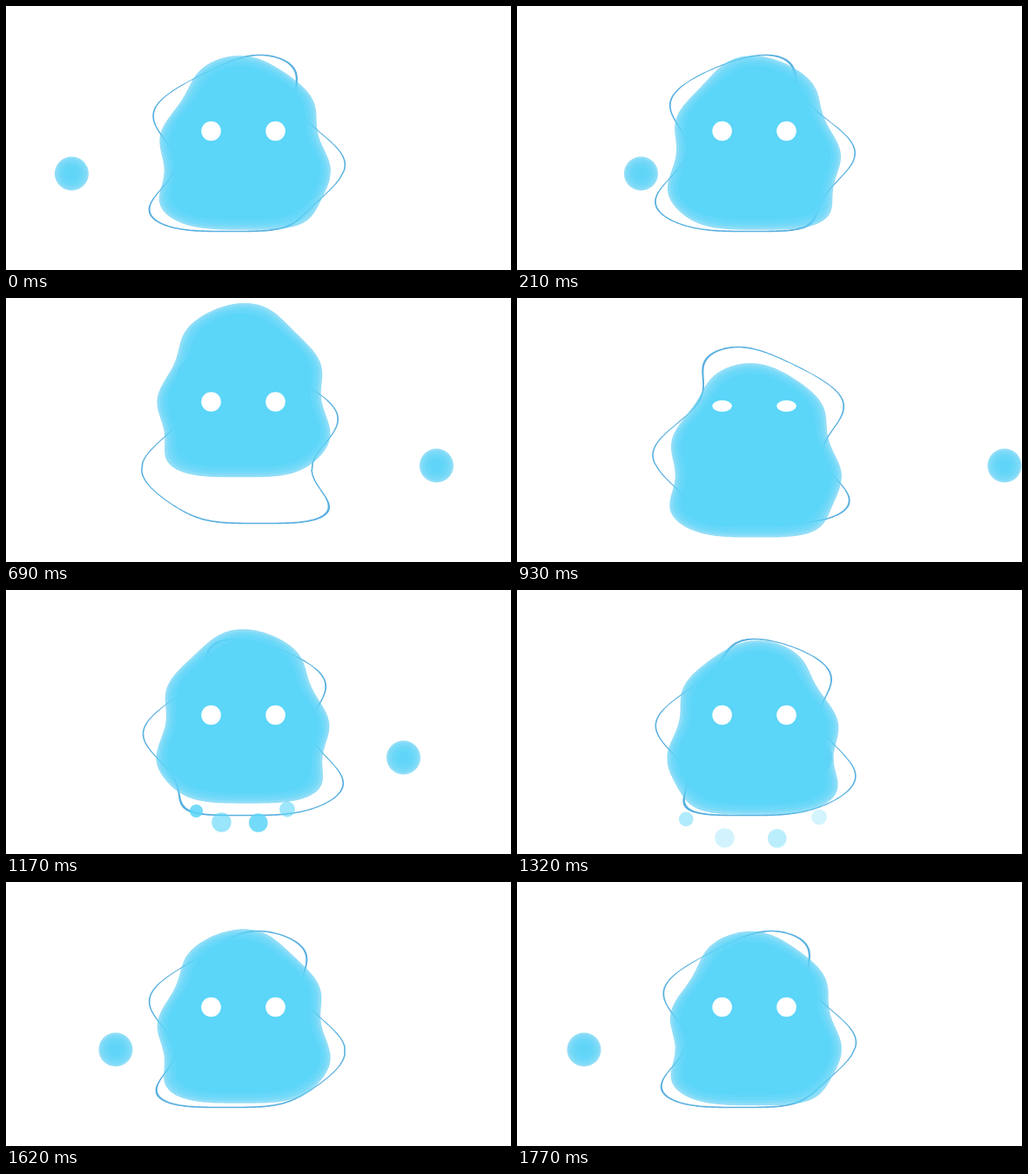
Recreate the animation shown at these times as an HTML page with a canvas. Size 580 by 304 pixels, loop 1800 ms.

```html
<!DOCTYPE html>
<html lang="en">
<head>
<meta charset="utf-8">
<title>Jumping blob</title>
<style>
  html, body { margin: 0; width: 100%; height: 100%; overflow: hidden; background: #fff; }
  canvas { display: block; }
</style>
</head>
<body>
<canvas id="stage" width="580" height="304"></canvas>
<script>
const ctx = document.getElementById('stage').getContext('2d');
const LOOP = 1800, STEP = 30, TAU = Math.PI * 2;
const CORE = '#5bd5f8', EDGE = '#5acdf3', LINE = '#58b0e0';
const CX = 272.6, MID = 190;

// Time and value pairs, eased between neighbours.
const bodyKeys = [[0, 0], [480, 0], [715, -53], [880, 21.5], [1130, -13], [1440, 8], [1660, -4], [1800, 0]];
const eyeKeys = [[0, 0], [500, 0], [680, -24.5], [870, -24.5], [1080, 0], [1800, 0]];
const blinkKeys = [[0, 1], [750, 1], [870, 0.12], [985, 1], [1800, 1]];
const ballKeys = [[0, 75.4], [900, 561.5], [1800, 75.4]];

// Position at 1170 ms, speed per ms, radius, opacity and end of fade.
const drops = [
  { x: 218.5, y: 254.5, vx: -0.162, vy: 0.062, r: 7.6, grow: 0.005, a: 0.85, end: 1520 },
  { x: 247.5, y: 267.5, vx: -0.06, vy: 0.12, r: 11.2, grow: 0, a: 0.62, end: 1440 },
  { x: 289.8, y: 268, vx: 0.06, vy: 0.12, r: 10.8, grow: 0, a: 0.85, end: 1460 },
  { x: 323, y: 252.5, vx: 0.16, vy: 0.06, r: 9, grow: 0, a: 0.6, end: 1440 }
];

const smooth = p => p * p * (3 - 2 * p);

function tween(keys, t) {
  const i = Math.max(1, keys.findIndex(k => k[0] > t));
  const [t0, a] = keys[i - 1], [t1, b] = keys[i];
  return a + (b - a) * smooth((t - t0) / (t1 - t0));
}

// Elliptic dome on a squarish base, shifted sideways by a rising wave.
function outline(shape, inset, t) {
  const { rx, top, bottom, pow, amp, wave, crest, period } = shape;
  const n = 240, w = rx - inset;
  for (let i = 0; i < n; i++) {
    const a = i / n * TAU, c = Math.cos(a), s = Math.sin(a);
    const e = s < 0 ? 1 : 2 / pow;
    const h = s < 0 ? MID - top - inset : bottom - MID - inset;
    const y = MID + Math.sign(s) * Math.abs(s) ** e * h;
    const shift = amp * Math.cos(TAU * ((y - crest) / wave + t / period));
    const x = CX + Math.sign(c) * Math.abs(c) ** e * w + shift;
    if (i) ctx.lineTo(x, y); else ctx.moveTo(x, y);
  }
  ctx.closePath();
}

const body = { rx: 95.6, top: 57.2, bottom: 257.7, pow: 3.4, amp: 4.7, wave: 85, crest: 190, period: 900 };
const ring = { rx: 98.5, top: 55.7, bottom: 260.3, pow: 3.6, amp: 19.2, wave: 128, crest: 182, period: 1800 };

function fill(color, alpha, rule = 'nonzero') {
  ctx.globalAlpha = alpha;
  ctx.fillStyle = color;
  ctx.fill(rule);
  ctx.globalAlpha = 1;
}

function oval(x, y, rx, ry, color, alpha = 1) {
  ctx.beginPath();
  ctx.ellipse(x, y, rx, ry, 0, 0, TAU);
  fill(color, alpha);
}

function drawRing(t) {
  ctx.beginPath();
  outline(ring, 0, t);
  outline(ring, 1.6, t);
  fill(LINE, 1, 'evenodd');
}

function drawBall(t) {
  const x = tween(ballKeys, t);
  oval(x, 193, 19.5, 19.5, EDGE, 0.68);
  [17, 13.5, 10, 6.5].forEach(r => oval(x, 193, r, r, CORE, 0.42));
}

function drawDrops(t) {
  if (t < 1000) return;
  for (const d of drops) {
    const dt = t - 1170;
    const fade = Math.min(1, (d.end - t) / (d.end - 1170));
    if (fade <= 0) continue;
    const r = d.r + d.grow * dt;
    oval(d.x + d.vx * dt, d.y + d.vy * dt, r, r, CORE, d.a * fade);
  }
}

function drawBody(t) {
  ctx.save();
  ctx.translate(0, tween(bodyKeys, t));
  [0, 3, 6, 9].forEach((inset, i) => {
    ctx.beginPath();
    outline(body, inset, t);
    fill(i ? CORE : EDGE, i ? 0.45 : 0.68);
  });
  ctx.beginPath();
  outline(body, 12, t);
  fill(CORE, 1);
  ctx.restore();
}

function drawEyes(t) {
  const y = 144 + tween(eyeKeys, t);
  const open = tween(blinkKeys, t);
  [235.6, 309.5].forEach(x => oval(x, y, 11.3, 11.3 * open, '#fff'));
}

function draw(now) {
  const t = Math.floor((now % LOOP) / STEP) * STEP;
  ctx.fillStyle = '#fff';
  ctx.fillRect(0, 0, 580, 304);
  drawRing(t);
  drawBall(t);
  drawDrops(t);
  drawBody(t);
  drawEyes(t);
}

const start = performance.now();
function tick() {
  draw(performance.now() - start);
  requestAnimationFrame(tick);
}
tick();
</script>
</body>
</html>
```
